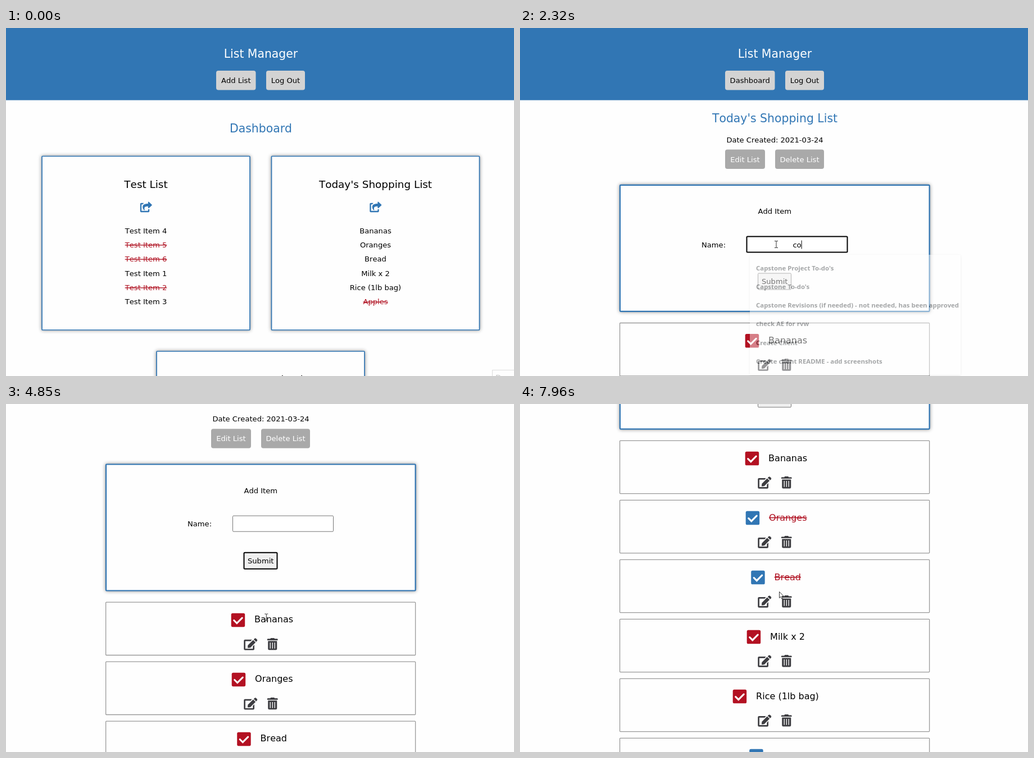
These frames come from a looping animation (904x620 px, 8000 ms). An HTML page:

```html
<!DOCTYPE html>
<html lang="en">
<head>
<meta charset="utf-8">
<title>List Manager</title>
<style>
  html, body { margin: 0; width: 100%; height: 100%; overflow: hidden; background: #fefefe; }
  svg { display: block; width: 904px; height: 620px; }
  text { font: 13.1px Verdana, "DejaVu Sans", sans-serif; font-kerning: none; white-space: pre; }
  .mid { text-anchor: middle; }
  .h1 { font-size: 20.4px; }
  .h2 { font-size: 18.4px; }
  .name { font-size: 16px; }
  .done { fill: #b01323; text-decoration: line-through; }
  .card { fill: #fefefe; stroke: #2f74b2; filter: drop-shadow(0 0 3px rgba(0, 0, 0, .45)); }
  .menu text { font: 600 11.4px "Segoe UI", "Open Sans", sans-serif; fill: #3c4043; }
  .menu rect { fill: #fff; filter: drop-shadow(0 1px 2px rgba(0, 0, 0, .15)); }
</style>
</head>
<body>
<svg id="stage" viewBox="0 0 904 620"></svg>
<script>
const LOOP = 8000, BLUE = '#3176b4', RED = '#b31122';
const $ = id => document.getElementById(id);

const text = (x, y, s, cls = 'mid', fill = '#000', id = '') =>
  `<text x="${x}" y="${y}" class="${cls}" fill="${fill}"${id && ` id="${id}"`}>${s}</text>`;

const rect = (x, y, w, h, attrs) =>
  `<rect x="${x}" y="${y}" width="${w}" height="${h}" ${attrs}/>`;

const button = (x, y, w, label, fill = '#d3d3d3', ink = '#000') =>
  rect(x, y, w, 34.5, `rx="4" fill="${fill}"`) + text(x + w / 2, y + 22.2, label, 'mid', ink);

const icon = (x, y, scale, fill, body) =>
  `<g transform="translate(${x} ${y}) scale(${scale})" fill="${fill}">${body}</g>`;

const EDIT = `
  <path d="M396 77L500 180L274 406L170 417Q159 417 160 404L170 302ZM419 54L455 18Q488 -8 516 12L565 60Q587 88 565 116L522 157Z"/>
  <path d="M345 64L294 128H64V448H384V346L448 282V464Q448 512 400 512H48Q0 512 0 464V112Q0 64 48 64Z"/>`;

const TRASH = `
  <path d="M0 56Q0 32 24 32H130L150 0H298L318 32H424Q448 32 448 56V96H0Z"/>
  <path fill-rule="evenodd" d="M32 128H416V464Q416 512 368 512H80Q32 512 32 464Z
    M112 192V448H144V192ZM208 192V448H240V192ZM304 192V448H336V192Z"/>`;

const SHARE = `
  <path d="M384 12Q400 -8 424 7L568 142Q584 160 568 177L424 313Q400 327 384 296V224C240 225 178 259 219 395Q222 424 194 413C155 383 120 326 120 269C120 125 238 97 384 96Z"/>
  <path d="M175 64L150 100L115 128H64V448H384V372L448 362V464Q448 512 400 512H48Q0 512 0 464V112Q0 64 48 64Z"/>`;

const header = (first, x1, w1, x2) =>
  rect(0, 0, 904, 128.6, `fill="${BLUE}"`) + text(453.5, 53, 'List Manager', 'mid h1', '#fff') +
  button(x1, 76, w1, first) + button(x2, 76, 69, 'Log Out');

function card(x, y, title, items) {
  const cx = x + 185;
  return rect(x, y, 370, 309.5, 'rx="1" class="card" stroke-width="1.7"') +
    text(cx, y + 56.7, title, 'mid h2') +
    icon(cx - 10.2, y + 81, .0365, BLUE, SHARE) +
    items.map((s, i) => text(cx, y + 137 + i * 25.35, s.replace('!', ''), s[0] === '!' ? 'mid done' : 'mid')).join('');
}

const rows = [['Bananas', 400.7], ['Oranges', 401.7], ['Bread', 411.2],
  ['Milk x 2', 403.7], ['Rice (1lb bag)', 378.7], ['Apples', 408.2]];

function row([name, x], i) {
  const y = 525.5 + i * 106;
  return rect(177.6, y, 551, 94.3, 'rx="1" fill="#fefefe" stroke="#999" stroke-width="1.3"') +
    rect(x, y + 19.5, 24.5, 24.5, `rx="2.6" id="box${i}"`) +
    `<path d="M${x + 5} ${y + 32.3}l5.1 5.1l9.4 -9.5" fill="none" stroke="#fff" stroke-width="3.1" stroke-linecap="round"/>` +
    text(x + 41.4, y + 36.3, name, 'name', '#000', 'name' + i) +
    icon(423.3, y + 64, .0417, '#3d3d41', EDIT) + icon(464.9, y + 63.8, .0417, '#3d3d41', TRASH);
}

const menu = (id, width, items) =>
  `<g class="menu" id="${id}">` + rect(409, 404, width, 214, '') +
  items.map((s, i) => text(420, 432 + i * 33.15, s, '')).join('') + '</g>';

const dashboard = header('Add List', 374, 70.5, 463) +
  text(453.5, 186, 'Dashboard', 'mid h1', BLUE) +
  card(64, 228.5, 'Test List',
    ['Test Item 4', '!Test Item 5', '!Test Item 6', 'Test Item 1', '!Test Item 2', 'Test Item 3']) +
  card(472.5, 228.5, "Today's Shopping List",
    ['Bananas', 'Oranges', 'Bread', 'Milk x 2', 'Rice (1lb bag)', '!Apples']) +
  card(268, 576, 'Two cars to load', []) +
  '<g id="tip">' + rect(865.5, 609.5, 50, 20, 'fill="#fefefe" stroke="#dcdcdc"') +
  text(871, 626.5, 'Download', '', '#c4c4c4') + '</g>';

const listPage = header('Dashboard', 365, 88.5, 472) +
  text(453.5, 168, "Today's Shopping List", 'mid h1', BLUE) +
  text(453.5, 203.7, 'Date Created: 2021-03-24') +
  button(365, 216.5, 71, 'Edit List', '#a9a9a9', '#fff') +
  button(454, 216.5, 87, 'Delete List', '#a9a9a9', '#fff') +
  rect(178, 279.8, 550.6, 225, 'rx="1" class="card" stroke-width="2.2"') +
  text(453.3, 331.4, 'Add Item') + text(323, 390.6, 'Name:', '') +
  rect(403.5, 371.5, 179, 28, 'rx="1.5" fill="#fff" id="field"') +
  text(493, 390.6, '', 'mid', '#000', 'typed') +
  rect(0, 378.5, 1, 15, 'fill="#000" id="caret"') +
  rect(423.5, 437, 59, 29, 'rx="1.5" fill="#efefef" id="submit"') +
  text(453.2, 456.3, 'Submit') +
  rows.map(row).join('') +
  menu('recent', 172, rows.map(r => r[0]).reverse()) +
  menu('matches', 375, ["Capstone Project To-do's", 'Capstone To-do\'s',
    'Capstone Revisions (if needed) - not needed, has been approved',
    'check AE for rvw', 'Create Client', 'Create client README - add screenshots']);

const pointers = `
  <g id="arrow"><path d="M.5 .5V11.6L3 9.2L4.8 13L6.6 12.2L4.9 8.5H8.3Z" fill="#fff" stroke="#222" stroke-width=".9"/></g>
  <g id="beam"><path d="M-3 -6H-1Q0 -6 0 -5Q0 -6 1 -6H3M0 -5V5M-3 6H-1Q0 6 0 5Q0 6 1 6H3" fill="none" stroke="#333"/></g>
  <g id="hand"><path d="M-1 1Q0 -.5 1 1V5.5L6 7V11L4.5 15H-1L-4 10V8L-1 9.5Z" fill="#fff" stroke="#222" stroke-width=".9"/></g>`;

$('stage').innerHTML = `<g id="dash">${dashboard}</g><g id="list">${listPage}</g>${pointers}`;

// Held values: [start, value]
const scrolls = [[0, 0], [4710, 23.6], [4780, 92], [4850, 172.3], [4910, 200],
  [5110, 238], [5180, 335], [5240, 422], [5310, 460.2]];
const typing = [[0, ''], [2050, 'c'], [2250, 'co'], [2450, 'cof'], [2580, 'coff'],
  [2780, 'coffe'], [2980, 'coffee'], [3650, '']];
const fade = [[0, 0], [2050, 1], [2250, .8], [2320, .46], [2380, .25], [2450, .1], [2580, 0]];

// Pointer path: [time, x, y, shape]
const path = [
  [70, 896, 606, 'arrow'], [460, 640, 290, 'hand'], [600, 640, 286, 'arrow'],
  [730, 574, 337, 'arrow'], [790, 574, 337, 'arrow'], [860, 567, 298, 'arrow'],
  [930, 556, 299, 'arrow'], [1060, 490, 372, 'beam'], [1400, 490, 372, 'beam'],
  [1590, 456, 385.5, 'beam'], [4370, 456, 385.5, 'beam'], [4380, 453, 384, 'beam'],
  [4780, 453, 384, 'beam'], [4850, 463.3, 380, 'beam'], [5600, 463.3, 380, 'beam'],
  [5640, 462, 370, 'arrow'], [6170, 423, 206.5, 'hand'], [6440, 423, 206.5, 'hand'],
  [6770, 415, 318, 'hand'], [7000, 415, 318, 'hand'], [7100, 415, 314, 'hand'],
  [7250, 415, 311, 'hand'], [7300, 436, 310, 'hand'], [7370, 424, 309, 'hand'],
  [7640, 424, 309, 'hand'], [7760, 436, 315, 'arrow'], [7960, 461, 334, 'arrow']];

const held = (keys, t) => keys.filter(k => k[0] <= t).pop()[1];
const show = (id, on) => $(id).setAttribute('display', on ? 'inline' : 'none');
const set = (id, attrs) => Object.entries(attrs).forEach(([k, v]) => $(id).setAttribute(k, v));
const focusRing = (on, idle) => on ? { stroke: '#000', 'stroke-width': 2 } : { stroke: idle, 'stroke-width': 1 };

function movePointer(t) {
  const i = path.findLastIndex(k => k[0] <= t);
  const a = path[i], b = path[i + 1] || a;
  ['arrow', 'beam', 'hand'].forEach(s => show(s, a && a[3] === s));
  if (!a) return;
  const p = a === b ? 0 : (t - a[0]) / (b[0] - a[0]);
  const x = a[1] + (b[1] - a[1]) * p, y = a[2] + (b[2] - a[2]) * p;
  set(a[3], { transform: `translate(${x} ${y})` });
}

function draw(t) {
  const onList = t >= 600, focused = t >= 1320 && t < 3450;
  show('dash', !onList);
  show('list', onList);
  show('tip', t < 130);
  set('list', { transform: `translate(0 ${-held(scrolls, t)})` });

  const word = held(typing, t);
  if ($('typed').textContent !== word) $('typed').textContent = word;
  set('field', focusRing(focused, t >= 1060 && t < 1320 ? '#4c4c4c' : '#767676'));
  set('submit', focusRing(t >= 3450 && t < 6440, '#767676'));
  show('caret', focused && !(t >= 1850 && t < 2050));
  set('caret', { x: 493 + (word && onList ? $('typed').getComputedTextLength() / 2 : 0) });

  show('recent', t >= 1320 && t < 2050);
  show('matches', t >= 2050 && t < 2580);
  set('matches', { opacity: held(fade, t) });

  rows.forEach((r, i) => {
    const done = i === 5 || (i === 1 && t >= 6440) || (i === 2 && t >= 7570);
    set('box' + i, { fill: done ? BLUE : RED });
    set('name' + i, { class: done ? 'name done' : 'name' });
  });
  movePointer(t);
}

const start = performance.now();
function tick() {
  draw((performance.now() - start) % LOOP);
  requestAnimationFrame(tick);
}
tick();
</script>
</body>
</html>
```
